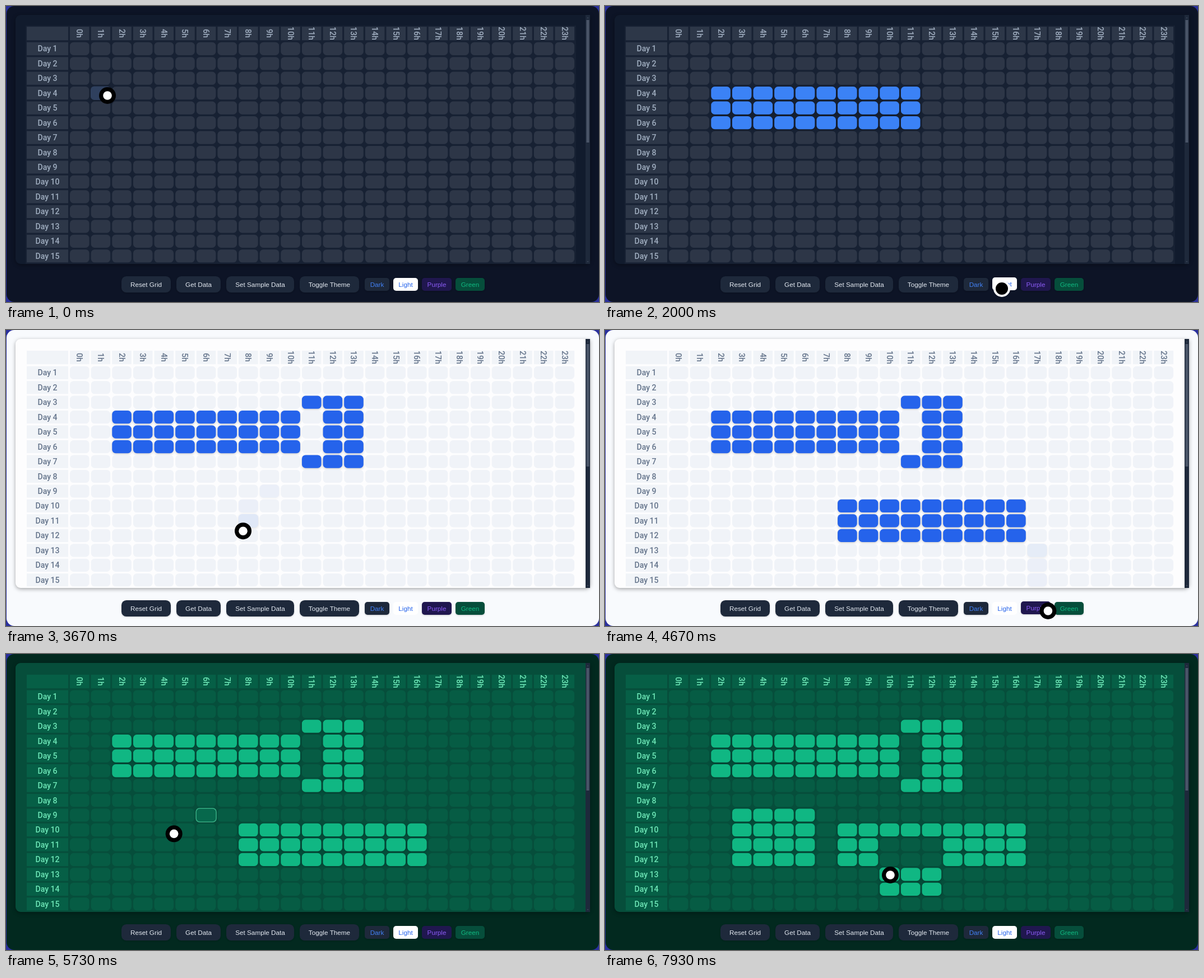
Animation of 1058x529 px, one loop 8000 ms. Source, as an HTML page with a canvas:

```html
<!DOCTYPE html>
<html lang="en">
<head>
<meta charset="utf-8">
<title>Schedule grid</title>
<style>
html, body { margin: 0; width: 100%; height: 100%; overflow: hidden; background: #2a309c; }
canvas { display: block; }
</style>
</head>
<body>
<canvas id="stage" width="1058" height="529"></canvas>
<script>
const ctx = document.getElementById('stage').getContext('2d');
const LOOP = 8000, LAG = 80, FADE = 200;
const COLS = 24, ROWS = 15;
const X0 = 114, Y0 = 64.7, PITCH_X = 37.63, PITCH_Y = 26.46, CELL_W = 34.6, CELL_H = 23.2;

const dark = { body: '#0d1426', panel: '#111b2d', grid: '#172133', head: '#2d3748', cell: '#2d3647', text: '#a0aec0', on: '#3b82f6' };
const light = { body: '#f8fafd', panel: '#fdfdfe', grid: '#fdfdfe', head: '#f1f4f8', cell: '#f0f3f8', text: '#64748b', on: '#2563eb' };
const green = { body: '#02291f', panel: '#064e3b', grid: '#064e3b', head: '#065f46', cell: '#065c44', text: '#6ee7b7', on: '#10b783' };
const themes = [{ at: -1000, look: dark }, { at: 2080, look: light }, { at: 4860, look: green }];

// Pointer path: time, x, y
const path = [
  [0, 181, 160], [330, 181, 160], [390, 202, 158], [900, 537, 209], [1020, 515, 214],
  [1200, 611, 479], [1340, 708, 505], [2200, 708, 505], [2590, 620, 236], [2660, 620, 236],
  [2800, 546, 165], [2900, 543, 130], [3020, 543, 130], [3650, 423, 359], [3760, 423, 360],
  [4280, 733, 314], [4360, 733, 314], [4670, 790, 502], [4750, 822, 503], [4980, 822, 503],
  [5540, 357, 288], [5640, 357, 288], [5730, 300, 321], [5900, 245, 367], [6080, 245, 367],
  [6520, 583, 341], [6640, 583, 341], [7100, 507, 420], [7240, 507, 420], [7480, 509, 395], [8000, 509, 395]
];

// Each drag flips the cells of its rectangle when released
const drags = [
  { down: 390, up: 960, a: [2, 3], b: [11, 5] },
  { down: 2640, up: 2980, a: [13, 6], b: [11, 2], compact: true },
  { down: 3740, up: 4320, a: [8, 11], b: [16, 9] },
  { down: 5640, up: 5990, a: [6, 8], b: [3, 11] },
  { down: 6630, up: 7180, a: [12, 10], b: [10, 13] }
];

const buttons = [
  ['Reset Grid', 206, 88], ['Get Data', 304, 79], ['Set Sample Data', 393, 121], ['Toggle Theme', 524, 106],
  ['Dark', 640, 44, '#1e293b', '#4280f4'], ['Light', 691, 44, '#ffffff', '#2563eb'],
  ['Purple', 742, 53, '#20174f', '#8b5cf6'], ['Green', 802, 52, '#064e3b', '#10b981']
];

const clamp = v => Math.max(0, Math.min(1, v));
const smooth = v => v * v * (3 - 2 * v);
const lerp = (a, b, k) => a + (b - a) * k;
const channels = hex => [1, 3, 5].map(i => parseInt(hex.slice(i, i + 2), 16));

function mix(a, b, k) {
  if (k <= 0) return a;
  const target = channels(b);
  return '#' + channels(a).map((v, i) => Math.round(lerp(v, target[i], k)).toString(16).padStart(2, '0')).join('');
}

function themeAt(t) {
  let look = dark;
  for (const step of themes) {
    const k = smooth(clamp((t - step.at) / 300));
    look = Object.fromEntries(Object.keys(look).map(key => [key, mix(look[key], step.look[key], k)]));
  }
  return look;
}

function pointer(t) {
  const i = path.findIndex(p => p[0] > t);
  if (i <= 0) return path[i === 0 ? 0 : path.length - 1].slice(1);
  const [ta, xa, ya] = path[i - 1], [tb, xb, yb] = path[i];
  let k = (t - ta) / (tb - ta);
  if (tb - ta > 330) k = smooth(k);
  return [lerp(xa, xb, k), lerp(ya, yb, k)];
}

function cellAt([x, y]) {
  const col = Math.floor((x - X0 + 1.5) / PITCH_X), row = Math.floor((y - Y0 + 1.5) / PITCH_Y);
  return col >= 0 && col < COLS && row >= 0 && row < ROWS ? [col, row] : null;
}

const between = (v, a, b) => v >= Math.min(a, b) && v <= Math.max(a, b);
const inside = (c, r, a, b) => between(c, a[0], b[0]) && between(r, a[1], b[1]);

function box(x, y, w, h, radius, fill) {
  ctx.beginPath();
  ctx.roundRect(x, y, w, h, radius);
  ctx.fillStyle = fill;
  ctx.fill();
}

function shadow(alpha, blur, dy) {
  ctx.shadowColor = `rgba(0,0,0,${alpha})`;
  ctx.shadowBlur = blur;
  ctx.shadowOffsetY = dy;
}

function label(text, x, y, color) {
  ctx.fillStyle = color;
  ctx.fillText(text, x, y);
}

function hoverWeights(t) {
  const weights = {};
  for (let k = 0; k < 5; k++) {
    const cell = cellAt(pointer(Math.max(0, t - LAG - k * 40)));
    if (cell) weights[cell] = (weights[cell] || 0) + 0.2;
  }
  return weights;
}

function drawPanel(look) {
  ctx.fillStyle = '#2a309c';
  ctx.fillRect(0, 0, 1058, 529);
  box(1, 0, 1057, 529, 14, look.body);
  shadow(0.35, 7, 2);
  box(17, 16, 1025, 445, [9, 0, 8, 9], look.panel);
  shadow(0, 0, 0);
  box(35, 35, 982, 426, 0, look.grid);
  ctx.fillStyle = '#1e293b';
  ctx.fillRect(1034, 16, 8, 445);
  ctx.fillStyle = '#4a5568';
  ctx.fillRect(1035.5, 25, 5, 219);
  for (const [y, d] of [[21, -1.5], [457, 1.5]]) {
    ctx.beginPath();
    ctx.moveTo(1036.5, y - d / 2);
    ctx.lineTo(1039.5, y - d / 2);
    ctx.lineTo(1038, y + d / 2);
    ctx.fill();
  }
}

function drawHeaders(look) {
  ctx.font = '500 14.08px Roboto, sans-serif';
  ctx.textAlign = 'center';
  box(37, 37, 74, 24.3, 0, look.head);
  for (let c = 0; c < COLS; c++) {
    const x = X0 + c * PITCH_X;
    box(x, 37, CELL_W, 24.3, 0, look.head);
    ctx.save();
    ctx.translate(x + CELL_W / 2, 49);
    ctx.rotate(Math.PI / 2);
    label(c + 'h', 0, 5, look.text);
    ctx.restore();
  }
  for (let r = 0; r < ROWS; r++) {
    const y = Y0 + r * PITCH_Y;
    box(37, y, 74, CELL_H, 0, look.head);
    label('Day ' + (r + 1), 74, y + 16.6, look.text);
  }
}

function drawCells(t, look) {
  const hover = hoverWeights(t);
  const active = drags.find(d => t >= d.down && t < d.up);
  const reach = active && (cellAt(pointer(Math.max(active.down, t - LAG))) || active.a);
  for (let r = 0; r < ROWS; r++) for (let c = 0; c < COLS; c++) {
    let on = 0;
    for (const d of drags) {
      if (inside(c, r, d.a, d.b)) on = lerp(on, 1 - on, smooth(clamp((t - d.up) / FADE)));
    }
    const warm = hover[[c, r]] || 0;
    const grow = warm * 0.7;
    const x = X0 + c * PITCH_X - grow, y = Y0 + r * PITCH_Y - grow;
    const w = CELL_W + 2 * grow, h = CELL_H + 2 * grow;
    const lift = Math.max(on, warm);
    if (lift > 0) shadow(0.2 * lift, 4, 1.5);
    box(x, y, w, h, 6.5, mix(mix(look.cell, look.on, 0.13 * warm), look.on, on));
    shadow(0, 0, 0);
    if (active && inside(c, r, active.a, reach)) {
      ctx.beginPath();
      ctx.roundRect(x, y, w, h, 6.5);
      ctx.globalAlpha = 0.65;
      ctx.lineWidth = 1.6;
      ctx.strokeStyle = mix(look.text, look.on, warm * 0.3);
      ctx.stroke();
      ctx.globalAlpha = 1;
    }
  }
}

function drawButtons([px, py]) {
  ctx.font = '11.73px "Liberation Sans", Arial, sans-serif';
  for (const [text, x, w, fill = '#1e293b', color = '#e2e8f0'] of buttons) {
    const small = w < 60, y = small ? 486 : 483, h = small ? 23 : 29;
    const raise = px > x && px < x + w && py > y && py < y + h ? 1 : 0;
    if (text !== 'Light') shadow(0.2, 3, 1);
    box(x, y - raise, w, h, small ? 5 : 8.8, fill);
    shadow(0, 0, 0);
    label(text, x + w / 2, 501.7 - raise, color);
  }
}

function drawPointer(t, [x, y]) {
  const circle = (radius, fill) => box(x - radius, y - radius, radius * 2, radius * 2, radius, fill);
  if (drags.some(d => d.compact && t >= d.down && t < d.up)) {
    box(x - 10, y - 10, 20, 20, 5, '#333840');
    circle(6, '#fff');
  } else if (y > 462 && t < themes[1].at) {
    circle(15, '#fff');
    circle(11, '#000');
  } else {
    circle(15, '#000');
    circle(7.8, '#fff');
  }
}

function frame(now) {
  const t = now % LOOP, look = themeAt(t), spot = pointer(t);
  drawPanel(look);
  drawHeaders(look);
  drawCells(t, look);
  drawButtons(spot);
  drawPointer(t, spot);
  requestAnimationFrame(frame);
}
frame(0);
</script>
</body>
</html>
```
